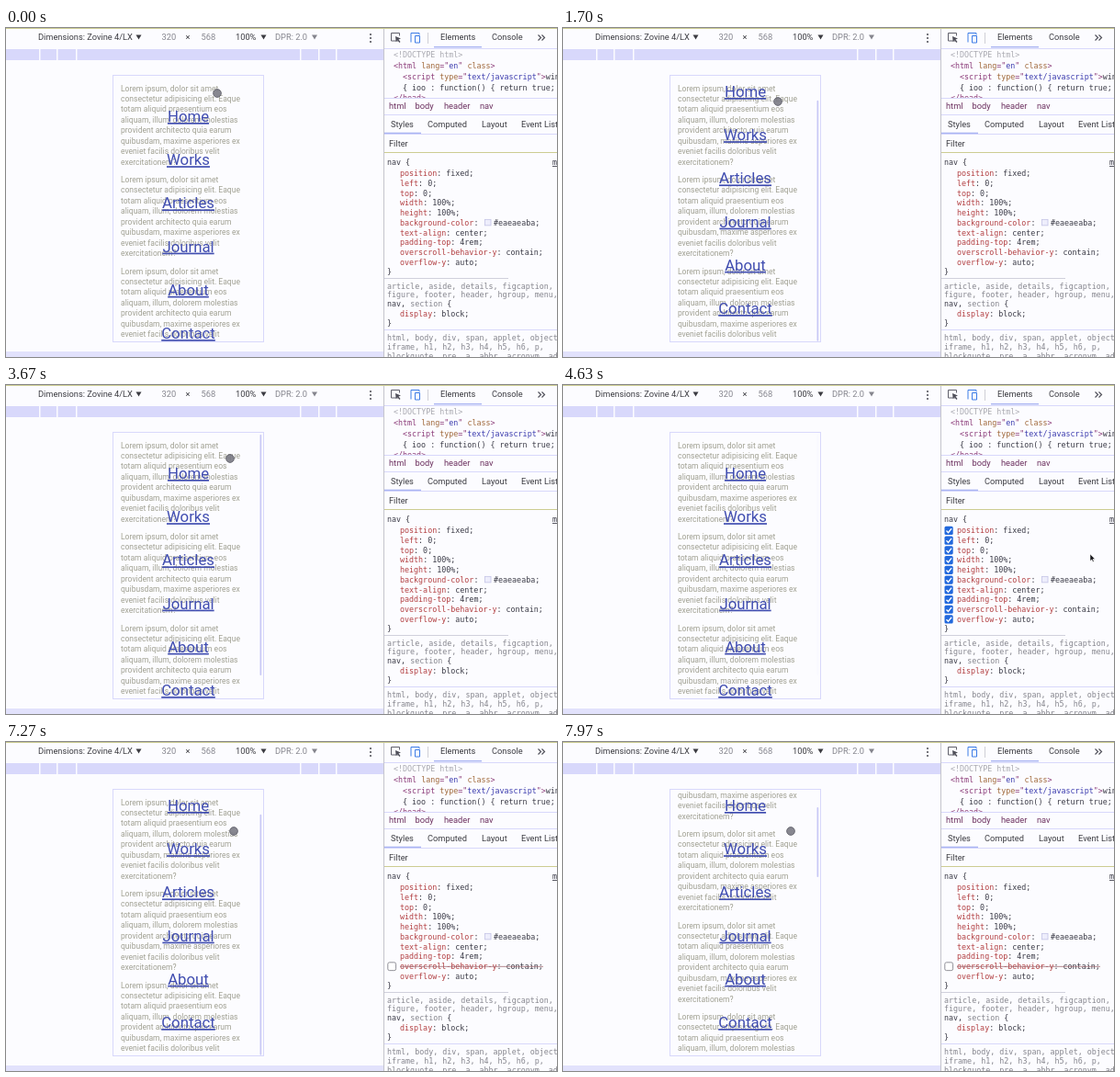
An HTML page that plays this animation: 600 px wide and 358 px high, repeating every 8 s.

```html
<!DOCTYPE html>
<html lang="en">
<head>
<meta charset="utf-8">
<title>Overscroll demo</title>
<style>
html, body { margin: 0; width: 100%; height: 100%; overflow: hidden; background: #fcfcff; }
svg { display: block; width: 600px; height: 358px; }
text { white-space: pre; }
.ui { font: 9.27px Roboto, sans-serif; fill: #3c3c42; }
.code { font: 8.36px "DejaVu Sans Mono", monospace; fill: #3a3a46; }
.body { font: 8.55px Roboto, sans-serif; fill: #a0a092; }
.link { font: 16.8px Roboto, sans-serif; fill: #404db0; text-anchor: middle; text-decoration: underline; }
.dim { fill: #85858d; }
.pale { fill: #a9a9b0; }
.tag { fill: #8a3a78; }
.crumb { fill: #6b2f5e; }
.attr { fill: #a0683a; }
.str { fill: #3c3cae; }
.prop { fill: #b23e40; }
</style>
</head>
<body>
<svg id="stage" viewBox="0 0 600 358"></svg>
<script>
const rect = (x, y, w, h, fill, extra = '') =>
  `<rect x="${x}" y="${y}" width="${w}" height="${h}" fill="${fill}" ${extra}/>`;
const text = (cls, x, y, s, extra = '') => `<text class="${cls}" x="${x}" y="${y}" ${extra}>${s}</text>`;
const span = (cls, s) => `<tspan class="${cls}">${s}</tspan>`;
const path = (d, stroke, extra = '') => `<path d="${d}" fill="none" stroke="${stroke}" ${extra}/>`;
const caret = (x, fill) => `<path d="M${x} 7.5h6l-3 5z" fill="${fill}"/>`;

const paper = '#fcfcff', lavender = '#d8d8fb', olive = '#cccc92';
const lorem = ['Lorem ipsum, dolor sit amet', 'consectetur adipisicing elit. Eaque',
  'totam aliquid praesentium eos', 'aliquam, illum, dolorem molestias',
  'provident architecto quia earum', 'quibusdam, maxime asperiores ex',
  'eveniet facilis doloribus velit', 'exercitationem?'];
const links = ['Home', 'Works', 'Articles', 'Journal', 'About', 'Contact'];
const rules = ['position: fixed', 'left: 0', 'top: 0', 'width: 100%', 'height: 100%',
  'background-color: #eaeaeaba', 'text-align: center', 'padding-top: 4rem',
  'overscroll-behavior-y: contain', 'overflow-y: auto'];
const OFF = 8;                       // the rule that gets unticked
const rowY = i => 158.3 + i * 10.73; // middle of a rule's line

function toolbar() {
  return text('ui', 35, 13.2, 'Dimensions: Zovine 4/LX') + caret(141.5, '#3c3c42') +
    text('ui dim', 169.5, 13.2, '320') + text('ui', 195.5, 13.2, '×') + text('ui dim', 212.5, 13.2, '568') +
    text('ui', 250, 13.2, '100%') + caret(277.5, '#3c3c42') +
    text('ui dim', 293, 13.2, 'DPR: 2.0') + caret(333, '#85858d') +
    [7, 11, 15].map(y => `<circle cx="397" cy="${y}" r="1.1" fill="#55555d"/>`).join('') +
    rect(0, 23, 411, 12, lavender) +
    [36, 55, 76, 320, 340, 359].map(x => rect(x, 23, 1.5, 12, paper)).join('') +
    rect(0, 352, 411, 6, '#e2e2fc');
}

function phone() {
  const paragraphs = [0, 1, 2, 3].flatMap(p => lorem.map((s, i) =>
    text('body', 125, 68.5 + p * 99.5 + i * 11.43, s))).join('');
  return rect(116.5, 51.5, 164, 290, paper, `stroke="${lavender}"`) +
    `<g clip-path="url(#screen)"><g id="page">${paragraphs}</g>` +
    `<g id="nav">${links.map((s, i) => text('link', 198.5, 102 + i * 47.2, s)).join('')}</g></g>` +
    rect(276.5, 54, 1.7, 262, '#c8c8f5', 'id="thumb" rx=".8"');
}

function markup() {
  const x = 422;
  return `<g clip-path="url(#tree)">` +
    text('code pale', x, 32, '&lt;!DOCTYPE html&gt;') +
    text('code tag', x, 44, `&lt;html ${span('attr', 'lang')}="${span('str', 'en')}" ${span('attr', 'class')}&gt;`) +
    text('code tag', x + 10, 56, `&lt;script ${span('attr', 'type')}="${span('str', 'text/javascript')}"&gt;${span('code', 'window')}`) +
    text('code', x + 10, 67.5, '{ ioo : function() { return true; }') +
    text('code tag', x, 79, '&lt;/head&gt;') + '</g>';
}

function rule(s, i) {
  const [name, value] = s.split(': '), y = rowY(i) + 2.9;
  const swatch = value[0] == '#';
  return text('code', 429, y,
    span('prop', name) + ': ' + (swatch ? `<tspan x="531">${value};</tspan>` : value + ';')) +
    (swatch ? rect(521.5, y - 6.5, 6.5, 6.5, '#eeeefc', 'stroke="#c4c4e6" stroke-width=".8"') : '');
}

function boxes() {
  const tick = i => {
    const y = rowY(i) - 4.5;
    return rect(415.5, y, 9.2, 9.2, '#2268dc', 'rx="1.6"') +
      path(`M417.5 ${y + 4.8}l2 2.1 3.6-4.5`, '#fff', 'stroke-width="1.4"');
  };
  const y = rowY(OFF);
  return `<g id="ticks">${rules.map((_, i) => i == OFF ? '' : tick(i)).join('')}</g>` +
    `<g id="lastTick">${tick(OFF)}</g>` +
    '<g id="unticked">' + path(`M429 ${y + .2}h156`, '#a06a70', 'stroke-width=".8"') +
    rect(415.8, y - 4.3, 8.8, 8.8, '#fff', 'rx="1.8" stroke="#85858d" stroke-width=".9"') + '</g>';
}

function devtools() {
  const line = (y, fill = lavender, w = 188) => rect(412, y, w, 1, fill);
  return rect(411, 0, 189, 358, paper) + line(22) +
    path('M427 14h-7.5v-8.5h9v3', '#60606a') + '<path d="M424 9l6 2.4-2.5 1 2 2.6-1.2.9-2-2.6-1.6 1.7z" fill="#50505a"/>' +
    path('M441 15.5v-10h9v2M445.5 8.5h5v7.5h-5z', '#3c7ce6') + rect(459, 5, 1, 12, '#cfcfd6') +
    text('ui', 473, 13.3, 'Elements') + text('ui', 529, 13.3, 'Console') +
    path('M579.5 7.5l3 3-3 3M583.5 7.5l3 3-3 3', '#50505a', 'stroke-width="1.2"') +
    rect(466, 20, 52, 1.4, '#a9b4f2') +
    markup() + line(76) +
    [['html', 417], ['body', 445.5], ['header', 477], ['nav', 516]]
      .map(([s, x]) => text('ui crumb', x, 88, s)).join('') +
    line(94) +
    [['Styles', 419], ['Computed', 459], ['Layout', 518], ['Event Listeners', 561]]
      .map(([s, x]) => text('ui', x, 107.7, s)).join('') +
    line(115) + rect(412, 113.7, 40, 1.4, '#a9b4f2') +
    text('ui', 417, 128.5, 'Filter') + line(135, olive) +
    text('code', 415, 149, 'nav {') + text('code', 595, 149, 'main.css', 'text-decoration="underline"') +
    rules.map(rule).join('') + text('code', 415, 268.2, '}') + boxes() +
    line(272, '#d0d0dc', 135) +
    text('code dim', 415, 283.5, 'article, aside, details, figcaption,') +
    text('code dim', 415, 293.3, 'figure, footer, header, hgroup, menu,') +
    text('code', 415, 303.2, `nav, ${span('dim', 'section')} {`) +
    text('code', 429, 313.6, `${span('prop', 'display')}: block;`) +
    text('code', 415, 324, '}') + line(328) +
    text('code dim', 415, 340, 'html, body, div, span, applet, object,') +
    text('code dim', 415, 350, 'iframe, h1, h2, h3, h4, h5, h6, p,') +
    text('code dim', 415, 359.5, 'blockquote, pre, a, abbr, acronym, address,') +
    rect(411, 0, 1, 358, '#c4c4cc');
}

const stage = document.getElementById('stage');
stage.innerHTML =
  `<defs><clipPath id="screen">${rect(117, 52, 163, 289, '#000')}</clipPath>` +
  `<clipPath id="tree">${rect(412, 23, 188, 53, '#000')}</clipPath></defs>` +
  rect(0, 0, 600, 358, paper) + toolbar() + phone() + devtools() + rect(0, 0, 600, 1, olive) +
  '<circle id="touch" r="4.4" fill="#7a7a84" fill-opacity=".9" stroke="#5c5c66" stroke-width=".8"/>' +
  '<path id="arrow" d="M0 0v7.6l1.8-1.6 1.2 2.6 1.2-.5-1.2-2.6h2.4z" fill="#18181c" stroke="#fff" stroke-width=".5"/>';

const el = id => document.getElementById(id);
const set = (id, name, value) => el(id).setAttribute(name, value);
const show = (id, on) => set(id, 'opacity', +on);
const ease = p => p * p * (3 - 2 * p);

// keys: [time, ...values], eased between neighbours
function track(keys, t) {
  const i = keys.findIndex(k => k[0] > t);
  if (i < 0) return keys.at(-1).slice(1);
  const a = keys[Math.max(0, i - 1)], b = keys[i];
  const p = i ? ease((t - a[0]) / (b[0] - a[0])) : 0;
  return a.slice(1).map((v, j) => v + (b[j + 1] - v) * p);
}

const pointer = [[0, 230, 71], [530, 234, 80], [2700, 234, 80], [3500, 244, 80], [3850, 244, 80],
  [4600, 574, 184], [5000, 574, 184], [5850, 421, 243.5], [6150, 421, 243.5], [6950, 248, 97]];
const navScroll = [[0, 0], [1050, 0], [1600, 27], [2900, 27], [3450, 0], [6900, 0], [7220, 27]];
const pageScroll = [[0, 0], [7450, 0], [7970, 65]];
const thumbAlpha = [[0, 0], [1030, 0], [1100, 1], [4250, 1], [4700, 0], [6880, 0], [6950, 1]];

function draw(t) {
  const [x, y] = track(pointer, t), [nav] = track(navScroll, t), [page] = track(pageScroll, t);
  const touching = x < 281, hover = x > 412 && y > 137 && y < 272, unticked = t >= 6000;
  set('nav', 'transform', `translate(0 ${-nav})`);
  set('page', 'transform', `translate(0 ${-page})`);
  set('thumb', 'y', page ? 54.5 + page * .255 : 54 + nav * .92);
  set('thumb', 'height', page ? 76 : 262);
  set('thumb', 'opacity', track(thumbAlpha, t)[0]);
  for (const id of ['touch', 'arrow']) set(id, 'transform', `translate(${x} ${y})`);
  show('touch', touching);
  show('arrow', !touching);
  show('ticks', hover);
  show('lastTick', hover && !unticked);
  show('unticked', unticked);
}

function frame() {
  draw(performance.now() % 8000);
  requestAnimationFrame(frame);
}
frame();
</script>
</body>
</html>
```
